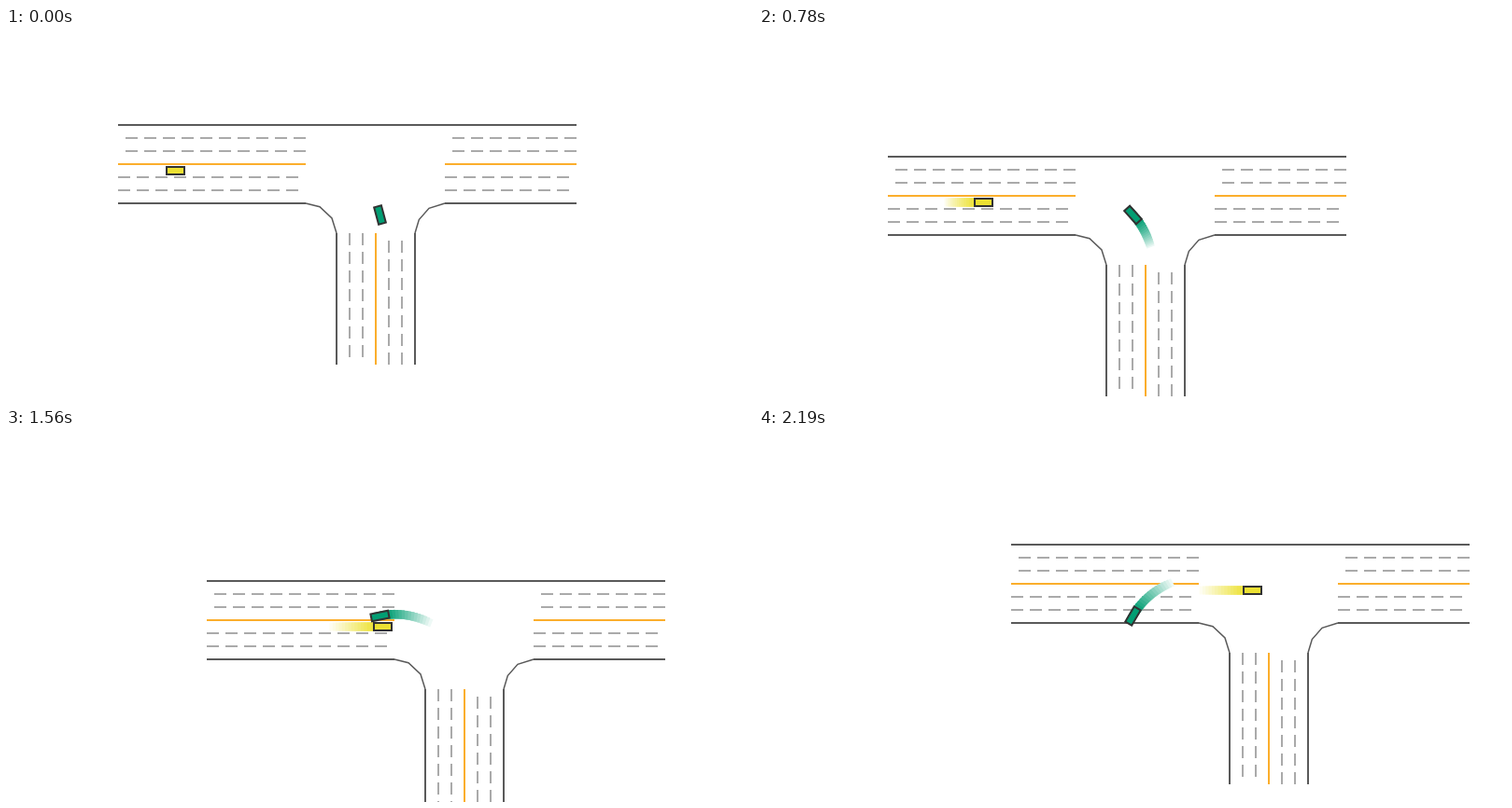
Write an HTML page with a canvas that moves like this. It is 800 px wide and 400 px high and loops after 2.22 s.

```html
<!DOCTYPE html>
<html lang="en">
<head>
<meta charset="utf-8">
<title>T-junction</title>
<style>
  html, body { margin: 0; width: 100%; height: 100%; overflow: hidden; background: #fff; }
  canvas { display: block; }
</style>
</head>
<body>
<canvas id="stage" width="800" height="400"></canvas>
<script>
const ctx = document.getElementById('stage').getContext('2d');

const LOOP = 2220, HOLD = 120, STEP = 30;
const EDGE = '#5a5a5a', DASH = '#aaaaaa', CENTRE = '#fbae2c', OUTLINE = '#323232';
const GREEN = [2, 158, 115], YELLOW = [236, 225, 51];
const RAD = Math.PI / 180;
const TURN_RADIUS = 81.85, TRAIL = 15;

// [step, value, rate per step]
const HEADING = [[0, 15, .3], [14, 27, 1.35], [23, 42, 1.95], [32, 61.5, 2.28],
                 [49, 101.2, 2.32], [59, 123.8, 2.31], [70, 149.8, 2.35]];
const DRIVEN = [[0, 0, .5], [14, 18, 2.1], [23, 41, 2.95], [32, 70, 3.28],
                [49, 127, 3.34], [59, 160, 3.34], [70, 197, 3.36]];

// Cubic Hermite interpolation
function sample(keys, k) {
  let i = 0;
  while (i < keys.length - 2 && k > keys[i + 1][0]) i++;
  const [k0, a, va] = keys[i], [k1, b, vb] = keys[i + 1];
  const d = k1 - k0, u = (k - k0) / d, w = 1 - u;
  return w * w * ((1 + 2 * u) * a + u * d * va) + u * u * ((3 - 2 * u) * b - w * d * vb);
}

// The turning car follows a circle; angles count from straight up to the left.
function turningCar(k) {
  const h = sample(HEADING, k) * RAD;
  return { x: TURN_RADIUS * Math.cos(h), y: -TURN_RADIUS * Math.sin(h), angle: -Math.PI / 2 - h };
}

const straightCar = k => ({ x: 61.5 + sample(DRIVEN, k), y: 49, angle: 0 });

function hLine(x, y, length, color) {
  ctx.fillStyle = color;
  ctx.fillRect(x, y - 1, length, 2);
}

function vLine(x, y, length, color) {
  ctx.fillStyle = color;
  ctx.fillRect(x - 1, y, 2, length);
}

function hDashes(x, y, count) {
  for (let i = 0; i < count; i++) hLine(x + 20 * i, y, 13, DASH);
}

function vDashes(x, y, count) {
  for (let i = 0; i < count; i++) vLine(x, y + 20 * i, 13, DASH);
}

function corner(points) {
  ctx.beginPath();
  for (const [x, y] of points) ctx.lineTo(x, y);
  ctx.strokeStyle = EDGE;
  ctx.lineWidth = 1.5;
  ctx.stroke();
}

function drawRoad() {
  for (const y of [14, 28]) { hDashes(8, y, 10); hDashes(358, y, 7); }
  for (const y of [56, 70]) { hDashes(0, y, 10); hDashes(350, y, 7); }
  for (const x of [248, 262]) vDashes(x, 116, 7);
  for (const x of [290, 304]) vDashes(x, 124, 7);
  for (const [y, color] of [[42, CENTRE], [84, EDGE]]) {
    hLine(0, y, 201, color);
    hLine(350, y, 141, color);
  }
  hLine(0, 0, 491, EDGE);
  vLine(234, 116, 141, EDGE);
  vLine(276, 116, 141, CENTRE);
  vLine(318, 116, 141, EDGE);
  corner([[201, 84], [216, 87.8], [229, 100], [234, 116]]);
  corner([[318, 116], [322.3, 101.5], [333, 89.3], [350, 84]]);
}

function drawBox(pose, w, h, rgb, strength, outlined) {
  ctx.save();
  ctx.translate(pose.x, pose.y);
  ctx.rotate(pose.angle);
  ctx.beginPath();
  ctx.rect(-w / 2, -h / 2, w, h);
  ctx.fillStyle = `rgb(${rgb.map(c => Math.round(255 + (c - 255) * strength))})`;
  ctx.fill();
  if (outlined) {
    ctx.strokeStyle = OUTLINE;
    ctx.lineWidth = 2;
    ctx.stroke();
  }
  ctx.restore();
}

function drawTrail(car, k, rgb) {
  for (let age = Math.min(k, TRAIL - 1); age > 0; age--) {
    drawBox(car(k - age), 20, 9, rgb, 1 - age / TRAIL, false);
  }
}

const drawCar = (car, k, rgb) => drawBox(car(k), 19, 8, rgb, 1, true);

// Run a drawing step with its origin at (x, y).
function at(x, y, draw) {
  ctx.save();
  ctx.translate(x, y);
  draw();
  ctx.restore();
}

function render(time) {
  const t = time % LOOP;
  const k = t < HOLD ? 0 : Math.floor((t - HOLD) / STEP) + 1;
  const start = turningCar(0), now = turningCar(k);
  const left = Math.round(120 + start.x - now.x);
  const top = Math.round(104 + start.y - now.y);
  const egoX = 400.5 - now.x, egoY = 200.5 - now.y;

  ctx.fillStyle = '#fff';
  ctx.fillRect(0, 0, 800, 400);
  at(left, top, () => {
    drawRoad();
    drawTrail(straightCar, k, YELLOW);
  });
  at(egoX, egoY, () => drawTrail(turningCar, k, GREEN));
  at(left, top, () => drawCar(straightCar, k, YELLOW));
  at(egoX, egoY, () => drawCar(turningCar, k, GREEN));
}

const begin = performance.now();
function tick() {
  render(performance.now() - begin);
  requestAnimationFrame(tick);
}
tick();
</script>
</body>
</html>
```
